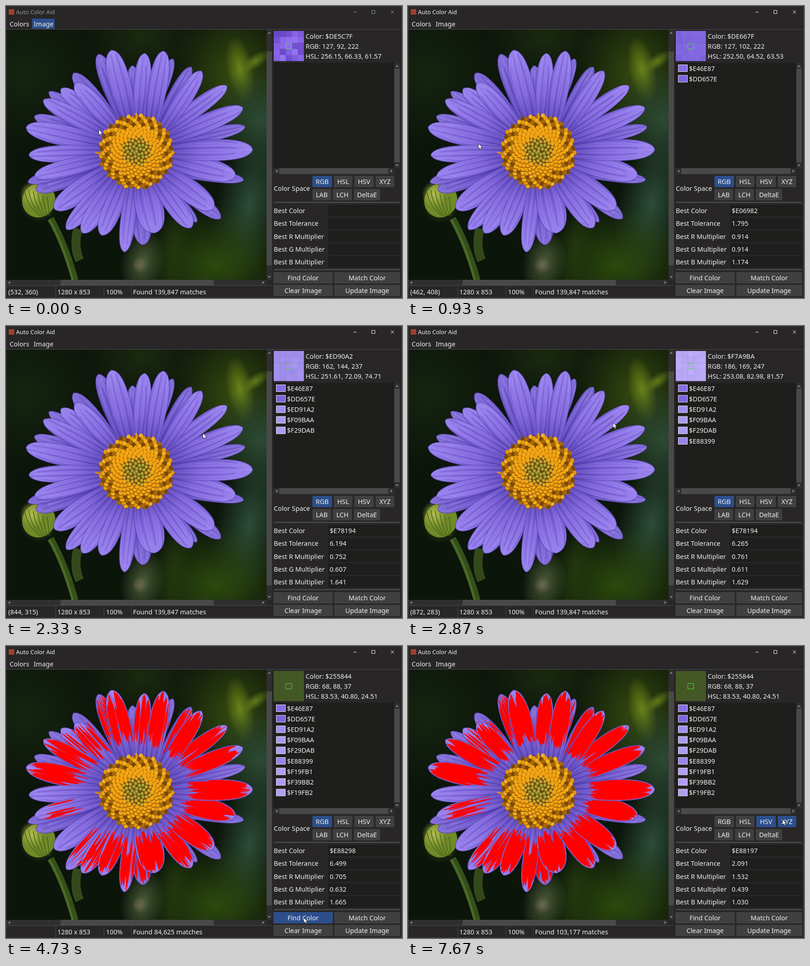
These frames come from a looping animation (871 by 643 pixels, 8000 ms). An HTML page with a canvas:

```html
<!DOCTYPE html>
<html lang="en">
<head>
<meta charset="utf-8">
<title>Auto Color Aid</title>
<style>
html, body { margin: 0; width: 100%; height: 100%; overflow: hidden; background: #282627; }
canvas { position: absolute; left: 1px; top: 52px; }
svg { position: absolute; left: 0; top: 0; font: 14.35px "Noto Sans", "Open Sans", sans-serif; fill: #f0f0f0; white-space: pre; }
</style>
</head>
<body>
<script>
const W = 871, H = 643, LOOP = 8000, STEP = 200 / 3;
const BLUE = '#2c4f8c', GREY = '#404040', DARK = '#1e1e1d';

let seed = 1;
const rnd = () => (seed = seed * 16807 % 2147483647) / 2147483647;

// ---------- photo ----------
const CX = 287, CY = 320, BACK = 14;
// tip x, tip y, width, red cover, sideways shift of the base; rear petals first
const PETALS = [
  [203, 106, 38, .3], [278, 131, 30], [367, 116, 28, .1], [407, 134, 32, .25, 14],
  [526, 266, 30], [523, 383, 28, 0, 25], [472, 468, 36], [420, 476, 24],
  [302, 526, 46, .6], [66, 406, 40], [48, 388, 30], [62, 243, 34], [94, 189, 30],
  [148, 148, 38, .06],
  [121, 182, 38, .15], [152, 170, 40, .4], [82, 207, 38, .5], [44, 267, 46, .75],
  [50, 328, 38], [63, 374, 38, .15], [106, 447, 48], [133, 492, 38, .2],
  [168, 500, 42, .35], [210, 505, 42, .6], [260, 542, 34, .5], [328, 500, 62, .9],
  [408, 488, 44, .6], [457, 446, 50, .9], [505, 374, 48, 1], [543, 316, 48, .9],
  [521, 224, 40, .8], [486, 176, 36, .7], [430, 143, 38, .8, 18],
  [305, 104, 38, .4], [347, 99, 42, .65, 18], [232, 97, 48, .8]
];

function layer() {
  const c = document.createElement('canvas');
  c.width = 572; c.height = 551;
  document.body.append(c);
  const g = c.getContext('2d');
  g.translate(-1, -52);
  return g;
}

function outline(g, len, h) {
  g.beginPath();
  g.moveTo(0, -h * .4);
  g.bezierCurveTo(len * .3, -h, len * .95, -h * 1.5, len, 0);
  g.bezierCurveTo(len * .95, h * 1.5, len * .3, h, 0, h * .4);
}

function eachPetal(g, draw) {
  PETALS.forEach(([x, y, w, red = 0, shift = 0], i) => {
    const a = Math.atan2(y - CY, x - CX);
    const bx = CX + 45 * Math.cos(a) - shift * Math.sin(a);
    const by = CY + 45 * Math.sin(a) + shift * Math.cos(a);
    seed = 999 + i * 7919;
    g.save();
    g.translate(bx, by);
    g.rotate(Math.atan2(y - by, x - bx));
    draw(Math.hypot(x - bx, y - by), w / 2, red, i);
    g.restore();
  });
}

function glow(g, x, y, rx, ry, color, angle = 0) {
  g.save();
  g.translate(x, y); g.rotate(angle); g.scale(rx, ry);
  const f = g.createRadialGradient(0, 0, 0, 0, 0, 1);
  f.addColorStop(0, color); f.addColorStop(1, color + '00');
  g.fillStyle = f;
  g.fillRect(-1, -1, 2, 2);
  g.restore();
}

function dot(g, x, y, r, color) {
  g.fillStyle = color;
  g.beginPath(); g.arc(x, y, r, 0, 7); g.fill();
}

function stem(g, w, color, ...p) {
  g.strokeStyle = color; g.lineWidth = w;
  g.beginPath(); g.moveTo(p[0], p[1]); g.quadraticCurveTo(...p.slice(2)); g.stroke();
}

function paintPhoto(g) {
  g.fillStyle = '#0c150a';
  g.fillRect(0, 52, 574, 552);
  glow(g, 40, 150, 170, 160, '#152410');
  glow(g, 300, 70, 130, 90, '#1b2a0e');
  glow(g, 500, 150, 140, 170, '#34490f');
  glow(g, 515, 140, 30, 75, '#6c8218', -.2);
  glow(g, 548, 122, 36, 16, '#637a1c', -.6);
  glow(g, 560, 250, 100, 120, '#2c4a35');
  glow(g, 535, 440, 75, 180, '#2c4c38', .2);
  glow(g, 460, 570, 170, 130, '#2c4a0d');
  glow(g, 370, 540, 40, 110, '#22380f', .1);
  glow(g, 300, 565, 48, 75, '#4b5c38', .2);
  glow(g, 295, 570, 18, 18, '#6a6550');
  stem(g, 15, '#34501a', 98, 468, 130, 525, 152, 604);
  stem(g, 5, '#4c6a28', 95, 470, 126, 525, 147, 604);
  stem(g, 20, '#33491a', 158, 490, 148, 530, 162, 560);
  glow(g, 72, 430, 42, 46, '#57701c');
  g.fillStyle = '#6f8a28';
  g.beginPath(); g.ellipse(72, 428, 36, 38, .5, 0, 7); g.fill();
  glow(g, 58, 415, 28, 30, '#b3bc4c');
  for (let i = 0; i < 6; i++) stem(g, 1.5, '#465e1a', 40 + i * 10, 400 + i * 4, 44 + i * 10, 440, 75 + i * 4, 462);

  dot(g, CX, CY, 95, '#4a359f');
  eachPetal(g, (len, h, red, i) => {
    const rear = i < BACK, f = g.createLinearGradient(0, 0, len, 0);
    f.addColorStop(.1, '#4e3aa8');
    f.addColorStop(.45, rear ? '#6650c4' : '#7c62d8');
    f.addColorStop(1, rear ? '#8570da' : '#9a84ee');
    outline(g, len, h);
    g.fillStyle = f; g.fill();
    g.strokeStyle = '#40309466'; g.lineWidth = 2; g.stroke();
    g.clip();
    for (let k = 0; k < 9; k++) {
      const y = (k / 4 - 1) * h;
      g.strokeStyle = k % 3 ? '#b8a6fa30' : '#4a34b03c';
      g.lineWidth = 1.5 + rnd() * 3;
      g.beginPath(); g.moveTo(len * .1, y * .5);
      g.quadraticCurveTo(len * .55, y * 1.2, len * (.8 + rnd() * .2), y * .6); g.stroke();
    }
  });

  dot(g, CX, CY, 72, '#704408');
  for (let i = 300; i >= 0; i--) {
    const a = i * 2.39996, r = 4.65 * Math.sqrt(i);
    const color = r < 20 ? '#a3a53a' : r < 32 ? '#cda52e' : r < 56 ? '#f2a414'
      : ['#e39a10', '#a8690a', '#f3b020', '#764608'][i % 4];
    const x = CX + r * Math.cos(a), y = CY + r * Math.sin(a);
    const size = r < 32 ? 3.1 : r < 56 ? 4.8 : 4.6;
    dot(g, x, y + 1, size + .7, r < 32 ? '#7c7020' : '#935c0a');
    dot(g, x, y, size, color);
  }
  stem(g, 4, '#e09a14', 286, 250, 290, 242, 285, 236);
  stem(g, 4, '#d98a14', 212, 324, 204, 326, 196, 322);
}

function paintMatches(g, boost) {
  eachPetal(g, (len, h, red) => {
    g.globalCompositeOperation = 'destination-out';
    outline(g, len, h); g.fill();
    g.globalCompositeOperation = 'source-over';
    if (!red) return;
    const cover = Math.min(1.2, red * (1 + boost * .4) + boost * .06);
    outline(g, len - 2, h - 2); g.clip();
    g.fillStyle = '#f00';
    for (let i = 0; i < cover * 60; i++) {
      const y = (rnd() * 2 - 1) * h * .9;
      const from = len * (.3 + rnd() * .35), to = len * (.78 + rnd() * .22);
      g.beginPath();
      g.ellipse((from + to) / 2, y, (to - from) / 2, .6 + rnd() * (1 + 3 * cover), 0, 0, 7);
      g.fill();
    }
  });
  g.globalCompositeOperation = 'destination-out';
  dot(g, CX, CY, 80, '#000');
}

paintPhoto(layer());
const overlays = [0, 1].map(boost => {
  const g = layer();
  paintMatches(g, boost);
  return g.canvas;
});

// ---------- timeline ----------
// time, cursor x, y, picture x, y, colour under the cursor (blue-green-red hex)
const KEYS = [
  [0, 204, 272, 532, 360, 'DE5C7F'], [330, 188, 282, 509, 376, 'E46E87'],
  [470, 188, 282, 509, 376, 'E46E87'], [800, 155, 303, 462, 408, 'DD657E'],
  [933, 155, 303, 462, 408, 'DE667F'], [1330, 405, 322, 805, 430, 'ED91A2'],
  [1733, 481, 362, 914, 489, 'F29AAA'], [2130, 470, 250, 895, 335, 'F29DAB'],
  [2530, 398, 222, 795, 295, 'E88399'], [2867, 451, 213, 872, 283, 'F7A9BA'],
  [3070, 451, 213, 872, 283, 'F7A9BA'], [3200, 440, 222, 856, 296, 'F19FB1'],
  [3400, 462, 240, 885, 320, 'F39BB2'], [3600, 480, 335, 910, 447, 'F19FB2'],
  [3800, 577, 444, 1035, 591, '355C43'], [3866, 588, 468, 0, 0, '255844'],
  [4400, 655, 598], [4730, 655, 598], [5270, 741, 386], [5970, 741, 386],
  [6330, 787, 385], [7070, 787, 385], [7400, 820, 384], [7600, 820, 384], [7666, 824, 382]
];
const PICKS = ['E46E87', 'DD657E', 'ED91A2', 'F09BAA', 'F29DAB', 'E88399', 'F19FB1', 'F39BB2', 'F19FB2'];
const PICK_TIMES = [330, 800, 1330, 1600, 2130, 2530, 3200, 3400, 3600];
// tolerance and three multipliers for each number of picks
const FITS = [
  [0, 1, 1, 1], [1.795, .914, .914, 1.174], [5.312, .741, .604, 1.655],
  [5.74, .727, .592, 1.682], [6.194, .752, .607, 1.641], [6.265, .761, .611, 1.629],
  [6.402, .718, .625, 1.657], [6.487, .707, .631, 1.662], [6.499, .705, .632, 1.665]
];

const parse = s => [4, 2, 0].map(i => parseInt(s.substr(i, 2), 16));
const bgr = c => '$' + [...c].reverse().map(v => v.toString(16).padStart(2, '0')).join('').toUpperCase();
const rgb = c => `rgb(${c.map(Math.round)})`;

function pose(t) {
  let i = KEYS.findIndex(k => k[0] > t);
  if (i < 0) i = KEYS.length;
  const a = KEYS[i - 1], b = KEYS[i] || a;
  const u = a === b ? 0 : (t - a[0]) / (b[0] - a[0]), e = u * u * (3 - 2 * u);
  const mix = (p, q) => Math.round(p + (q - p) * e);
  const end = parse(b[5] || '255844');
  return {
    x: mix(a[1], b[1]), y: mix(a[2], b[2]), px: mix(a[3], b[3]), py: mix(a[4], b[4]),
    color: parse(a[5] || '255844').map((v, k) => mix(v, end[k]))
  };
}

function hsl(c) {
  const [r, g, b] = c, max = Math.max(...c), min = Math.min(...c), d = max - min || 1, sum = max + min;
  const h = max === r ? (g - b) / d + 6 : max === g ? (b - r) / d + 2 : (r - g) / d + 4;
  return [h % 6 * 60, 100 * (max - min) / (sum > 255 ? 510 - sum : sum || 1), sum / 5.1]
    .map(v => v.toFixed(2)).join(', ');
}

function bestFit(n, t) {
  if (!n) return [];
  if (t >= 6930) return ['$E88197', '2.091', '1.532', '0.439', '1.030'];
  if (t >= 6000) return ['$E88298', '2.318', '1.487', '0.466', '1.047'];
  const picked = PICKS.slice(0, n).map(parse);
  const middle = [0, 1, 2].map(i => {
    const v = picked.map(c => c[i]);
    return Math.min(...v) + Math.max(...v) >> 1;
  });
  return [bgr(middle), ...FITS[n - 1].map(v => v.toFixed(3))];
}

// ---------- interface ----------
const text = (s, x, y, more = '') => `<text x="${x}" y="${y}" ${more}>${s}</text>`;
const rect = (x, y, w, h, fill, more = '') =>
  `<rect x="${x}" y="${y}" width="${w}" height="${h}" fill="${fill}" ${more}/>`;
const path = (d, more) => `<path d="${d}" ${more}/>`;
const arrow = (x, y, a) =>
  path('M-3.5 2L0-2L3.5 2Z', `fill="#858585" transform="translate(${x} ${y}) rotate(${a})"`);

const SPACES = [
  ['RGB', 674, 374, 43], ['HSL', 721, 374, 41], ['HSV', 766, 374, 43], ['XYZ', 813, 374, 41],
  ['LAB', 674, 403, 41], ['LCH', 719, 403, 42], ['DeltaE', 765, 403, 58]
];
const ACTIONS = [
  ['Find Color', 588, 586, 131], ['Match Color', 722, 586, 145],
  ['Clear Image', 588, 614, 131], ['Update Image', 722, 614, 145]
];
const LABELS = ['Color', 'Tolerance', 'R Multiplier', 'G Multiplier', 'B Multiplier'];

const frame =
  path('M0 0H871V52H0ZM0 603H871V643H0ZM573 52H871V603H573ZM0 52H1V603H0Z', 'fill="#282627"') +
  rect(.5, .5, W - 1, H - 1, 'none', 'stroke="#414040"') +
  rect(0, 51, W, 1, '#4b4a4a') +
  rect(6, 7, 12, 12, '#a3402c') +
  rect(573, 52, 12, 551, '#302e2f') + rect(573, 100, 12, 471, '#4a4949') +
  rect(1, 603, 572, 12, '#302e2f') + rect(120, 603, 337, 12, '#4a4949') +
  arrow(579, 59, 0) + arrow(579, 597, 180) + arrow(7, 609, -90) + arrow(566, 609, 90) +
  rect(588, 125, 266, 232, DARK) +
  rect(854, 125, 12, 232, '#302e2f') + rect(854, 138, 12, 206, '#4a4949') +
  rect(588, 357, 266, 13, '#302e2f') + rect(601, 357, 240, 13, '#4a4949') +
  arrow(860, 132, 0) + arrow(860, 351, 180) + arrow(595, 363.5, -90) + arrow(848, 363.5, 90) +
  rect(589, 431, 277, 3, '#474646') + rect(589, 579, 277, 3, '#474646') +
  rect(0, 615, 585, 1, '#4b4a4a') +
  [109, 215, 275].map(x => rect(x, 616, 1, 26, '#4b4a4a')).join('') +
  text('Color Space', 589, 407) +
  LABELS.map((s, i) => text('Best ' + s, 589, 456 + i * 28.3) + rect(709, 438 + i * 28.3, 158, 25, DARK)).join('') +
  text('1280 x 853', 113, 635) + text('100%', 220, 635);

function preview(color, jitter) {
  let s = '';
  seed = 4242 + color[1] * 31;
  for (let i = 0; i < 25; i++) {
    const d = (rnd() * 2 - 1) * jitter;
    s += rect(589 + i % 5 * 13.2, 55 + (i / 5 | 0) * 13.2, 13.5, 13.5, rgb(color.map(v => v + d)));
  }
  return s + rect(615.5, 82.5, 13, 12, 'none', 'stroke="#58d63c"');
}

function ui(t) {
  const p = pose(t), n = PICK_TIMES.filter(v => v <= t).length;
  const idle = t < 60, away = t >= 3860, leaving = t > 3610 && !away;
  const space = t < 6000 ? 'RGB' : t < 6930 ? 'HSL' : 'HSV';
  const count = t < 4460 ? '139,847' : t < 6000 ? '84,625' : t < 6930 ? '101,962' : '103,177';
  const ink = idle ? '#999' : '#f4f4f4';
  const button = ([s, x, y, w]) => {
    const hot = s === space || p.x >= x && p.x < x + w && p.y >= y && p.y < y + 25;
    return rect(x, y, w, 25, hot ? BLUE : GREY, 'rx="2"') +
      text(s, x + w / 2, y + 18, 'text-anchor="middle"');
  };
  return frame +
    text('Auto Color Aid', 22, 18, `font-size="12.65" fill="${ink}"`) +
    path('M764 13.5H771M804.5 9.5H811.5V16.5H804.5ZM846.5 9.5L853.5 16.5M853.5 9.5L846.5 16.5', `fill="none" stroke="${ink}"`) +
    (idle ? rect(57, 28, 50, 22, BLUE) : '') +
    text('Colors', 8, 45) + text('Image', 61, 45) +
    preview(leaving ? parse('F19FB2') : p.color, idle ? 24 : leaving ? 14 : away ? 0 : 4) +
    text('Color: ' + bgr(p.color), 659, 72) +
    text('RGB: ' + p.color.join(', '), 659, 94) +
    text('HSL: ' + hsl(p.color), 659, 116) +
    PICKS.slice(0, n).map((c, i) =>
      rect(594.5, 129.5 + i * 23.2, 20, 15, rgb(parse(c)), 'stroke="#e4e4e4"') +
      text('$' + c, 618, 142.5 + i * 23.2)).join('') +
    SPACES.map(button).join('') + ACTIONS.map(button).join('') +
    bestFit(n, t).map((s, i) => text(s, 712, 456 + i * 28.3)).join('') +
    (away ? '' : text(`(${p.px}, ${p.py})`, 5, 635)) +
    text(`Found ${count} matches`, 279.5, 635) +
    path('M0 0V12L2.8 9.5L4.7 13.8L6.7 12.9L4.9 8.8H8.6Z',
      `fill="#fff" stroke="#111" stroke-width=".8" transform="translate(${p.x} ${p.y})"`);
}

const svg = document.createElementNS('http://www.w3.org/2000/svg', 'svg');
svg.setAttribute('width', W);
svg.setAttribute('height', H);
document.body.append(svg);

const start = performance.now();
let shown = -1;
function tick() {
  const step = Math.floor((performance.now() - start) % LOOP / STEP + .1);
  if (step !== shown) {
    shown = step;
    const t = step * STEP % LOOP;
    overlays[0].hidden = t < 4460 || t >= 6000;
    overlays[1].hidden = t < 6000;
    svg.innerHTML = ui(t);
  }
  requestAnimationFrame(tick);
}
tick();
</script>
</body>
</html>
```
